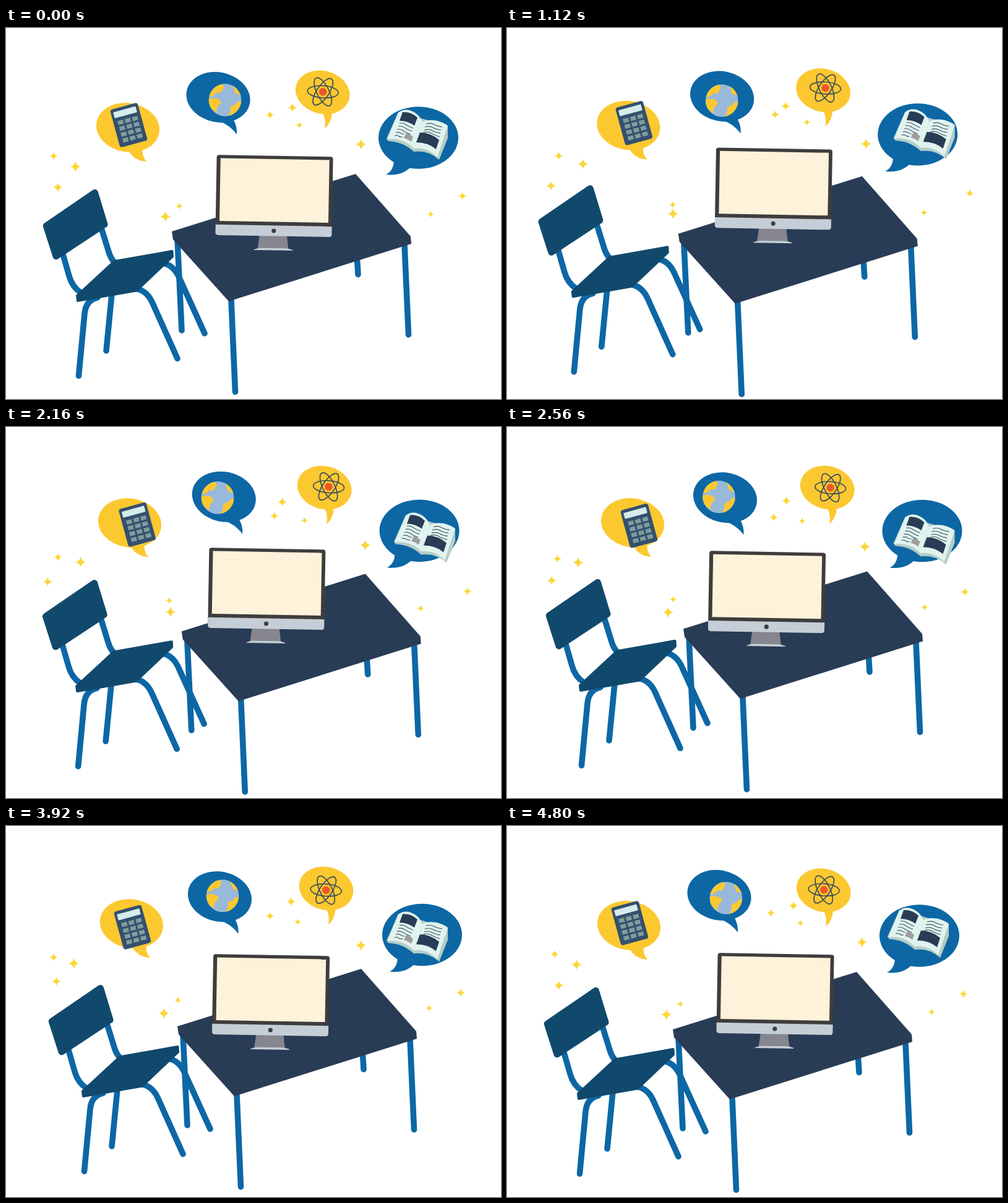
An HTML page that plays this animation: 800x600 px, repeating every 4880 ms.

```html
<!DOCTYPE html>
<html lang="en">
<head>
<meta charset="utf-8">
<title>Study desk</title>
<style>
html, body { margin: 0; width: 100%; height: 100%; overflow: hidden; background: #fff; }
svg { display: block; width: 800px; height: 600px; }
.blue { fill: #0d67a5; }
.yellow { fill: #fcc830; }
.navy { fill: #293c55; }
.seat { fill: #11496d; stroke: #11496d; stroke-linejoin: round; }
.legs { fill: none; stroke: #0d67a5; stroke-width: 9.6; stroke-linecap: round; }
.stars { fill: #fcd638; }
.lines { fill: none; stroke: #4a5967; stroke-width: 1.2; }
</style>
</head>
<body>
<svg viewBox="0 0 800 600">
  <defs>
    <path id="star" d="M0-1Q.16-.16 1 0Q.16.16 0 1Q-.16.16-1 0Q-.16-.16 0-1Z"/>
    <clipPath id="disc"><circle cx="354" cy="116.5" r="26.3"/></clipPath>
  </defs>

  <g class="stars" data-move="3 -.2 6.8 -.6 8 1 4.5 5.7 .5 8.6 0 5">
    <use href="#star" transform="translate(77 207.3) scale(6.6)"/>
    <use href="#star" transform="translate(426.7 140.5) scale(6.6)"/>
    <use href="#star" transform="translate(573.8 188) scale(8.6)"/>
  </g>
  <g class="stars" data-move="5 -2 10.7 -4.6 11.5 -6 2.7 -5 -4.3 -3.5 -2.7 -2">
    <use href="#star" transform="translate(112.3 224.3) scale(8.7)"/>
    <use href="#star" transform="translate(257.8 305) scale(8.7)"/>
    <use href="#star" transform="translate(474.2 157) scale(5.6)"/>
    <use href="#star" transform="translate(737.6 271.7) scale(6.6)"/>
  </g>
  <g class="stars" data-move="-6 -1 -13 -2.6 -17.7 -5.2 -11.5 -9.5 -5.5 -10.7 -2.3 -6.5">
    <use href="#star" transform="translate(83.8 257.8) scale(7.5)"/>
    <use href="#star" transform="translate(280.2 288.2) scale(5.6)"/>
    <use href="#star" transform="translate(463 128.8) scale(7.3)"/>
    <use href="#star" transform="translate(686.3 301) scale(5.6)"/>
  </g>

  <g class="yellow" data-move="-.7 -1.7 -.6 -3.4 1 -5 6 -6 10 -5.3 5.8 -2.9">
    <ellipse cx="197" cy="161" rx="51.3" ry="39.6" transform="rotate(9 197 161)"/>
    <path d="M198 198Q207 215 227 216Q219 207 221 194Z"/>
    <ellipse cx="511.7" cy="104" rx="44.3" ry="34.8" transform="rotate(14 511.7 104)"/>
    <path d="M512 137Q518 150 515 162.5Q526 154 527 136Z"/>
  </g>
  <g class="blue" data-move="2 -1.2 4.8 -1.4 7.5 -.5 9.5 2.3 6 3 2.5 2.3">
    <ellipse cx="343" cy="112" rx="52" ry="40.4" transform="rotate(12 343 112)"/>
    <path d="M342 150Q361 156 373 172Q374 159 367 147Z"/>
  </g>
  <g class="blue" data-move="-2 -2 -2.8 -5.5 -1 -8.5 4.5 -9.5 8 -5.5 6 -1.5">
    <ellipse cx="666.5" cy="177.5" rx="64.5" ry="50.3"/>
    <path d="M627 212Q627 231 614 237Q639 240 654 225Z"/>
  </g>

  <g data-move="3 -3 7.2 -3.2 11.5 -1 15 2.7 13.5 6.6 6 6.6">
    <g id="calculator" transform="translate(198.4 157) rotate(-15.3)">
      <rect x="-23" y="-31.7" width="46" height="63.4" rx="4" fill="#34506f"/>
      <rect x="-19" y="-26.5" width="37.5" height="10" rx="1" fill="#d5ecec"/>
    </g>
  </g>

  <g data-move="-2.7 1 -7 .9 -10.5 -.5 -11.5 -3.5 -7.5 -4.5 -4 -3.5">
    <circle cx="354" cy="116.5" r="26.3" fill="#98b9da"/>
    <path class="yellow" clip-path="url(#disc)" d="M327 112L333 96L346 89Q353 92 352 97Q350 99 349 103Q346 106 341 104Q338 106 336 109Q331 110 327 112Z
      M326 115Q334 112 340 114Q349 117 347 122Q342 125 341 131Q339 135 342 138L326 126Z
      M367 92Q366 97 369 99Q368 104 373 107Q376 106 379 110L384 98Z
      M382 119Q375 117 373 121Q372 124 366 125Q361 128 363 133Q362 138 359 142H376L384 126Z"/>
  </g>

  <g data-move="0 -3.5 2.5 -6.3 6.5 -7 10.5 -5 8 -1.5 5 .5">
    <g transform="translate(512.2 103.2)">
      <g fill="none" stroke="#3c4d5c" stroke-width="1.7">
        <ellipse rx="25" ry="9.8" transform="rotate(4)"/>
        <ellipse rx="25" ry="9.8" transform="rotate(64)"/>
        <ellipse rx="25" ry="9.8" transform="rotate(124)"/>
      </g>
      <circle r="5.8" fill="#e95a28" stroke="#e95a28" stroke-width="1.5" stroke-dasharray="3 1.5"/>
    </g>
  </g>

  <g data-move="4 -2 10 -.8 12.8 3.5 9.5 9.3 3.5 11.3 0 6.3">
    <path fill="#b5cdc7" d="M634 136L615 179L618 183Q642 184 659 200Q682 197 700 213L714 178V158Z"/>
    <path fill="#e0f3ef" d="M634 137C645 126 667 135 673 152L659 195C648 183 632 178 616 180Z"/>
    <path fill="#e0f3ef" d="M673 152C684 146 703 149 714 158L697 209C687 198 673 193 659 195Z"/>
    <path class="navy" d="M641 136Q655 135 665 145L660 158Q649 150 636 150Z M669 169Q686 169 700 181L695 196Q682 185 663 185Z"/>
    <path fill="#9d9d9b" d="M647 170Q653 172 658 176L655 184Q650 180 643 178Z"/>
    <path class="lines" d="M636 154q6-1 10 2t12 6M634 159q6-1 10 2t12 6M632 164q6-1 10 2t12 6M630 169q5-1 8 1t6 2M628 174q5-1 7 1t6 1
      M679 155q8-2 13 1t13 4M677 160q8-2 13 1t13 4M676 165q8-2 13 1t13 4M674 169q8-2 13 1t14 6"/>
  </g>

  <g data-move="4.5 2 9 3.8 13 3.7 17 -2.5 16 -8 9 -5">
    <path class="legs" d="M277 342L284 489M364 440L370.5 588.5M644 350L650.5 496M567.5 374L569 398.5"/>
    <path class="navy" d="M565 236L654 337L655 349L360 442L270 342L268 329Z"/>
    <path d="M270 331L360 431L653 338" fill="none" stroke="#46566b" stroke-width=".7" stroke-dasharray="1 2"/>
  </g>

  <g data-move="-6 -2 -9.2 -7 -5.2 -11.8 3 -15 9 -12 9 -4">
    <path class="legs" d="M92 366L102 401Q107 419 121 428M153 320L166 362Q169 373 177 381
      M117.5 562.5L127 462Q129 440 148 436M162 522L171 430
      M205 421Q226 422 236 443L277 534.5M252 380Q271 382 281 406L321 494"/>
    <path class="seat" stroke-width="11" d="M143.5 266.5L159 317.5L81 369L65.3 320Z"/>
    <path class="seat" stroke-width="4" d="M175 377.5L268.5 361L269 369.5L211 424.5L116 441L115 433Z"/>
  </g>

  <g data-move="1 -6.2 -3 -12 -9 -13 -13.5 -4.8 -10 1.5 -5.5 2">
    <g transform="rotate(1 433.5 271.8)">
      <path fill="#85868f" d="M411 335H455L458 358H408Z"/>
      <path fill="#c5ced6" d="M401 359.5Q408 356 414 356H452Q459 356 465 358.5V359.5Z"/>
      <rect x="339.5" y="206.7" width="188" height="125" rx="4" fill="#3e3d3d"/>
      <rect x="345.7" y="212" width="176" height="101.5" fill="#fff2da"/>
      <path fill="#c5ced6" d="M339.5 319.5H527.5V332Q527.5 336.5 523 336.5H344Q339.5 336.5 339.5 332Z"/>
      <circle cx="433.8" cy="328" r="3.6" fill="#3e3d3d"/>
    </g>
  </g>
</svg>
<script>
const LOOP = 4880, STEP = 80, TURN = 4800;
const keyTimes = [0, 560, 1160, 1760, 2560, 3280, 3920];

const calculator = document.getElementById('calculator');
for (let i = 0; i < 12; i++) {
  const key = document.createElementNS(calculator.namespaceURI, 'rect');
  const box = { x: -16 + i % 3 * 12, y: -11 + Math.floor(i / 3) * 9.8, width: 9, height: 6.6, fill: '#7f9d9b' };
  for (const name in box) key.setAttribute(name, box[name]);
  calculator.append(key);
}

// Each part starts at rest position and passes these offsets at the key times.
const parts = [...document.querySelectorAll('[data-move]')].map(node => ({
  node, offsets: [0, 0, ...node.dataset.move.split(' ').map(Number)]
}));

// Periodic interpolation: smooth closed orbits through every key point.
const halfSine = dt => Math.sin(Math.PI * dt / TURN);
const weightsAt = time => keyTimes.map(a => keyTimes.reduce(
  (w, b) => a === b ? w : w * halfSine(time - b) / halfSine(a - b), 1));

function draw(now) {
  const weights = weightsAt(Math.floor(now % LOOP / STEP) * STEP);
  for (const { node, offsets } of parts) {
    const [x, y] = [0, 1].map(axis =>
      weights.reduce((sum, w, i) => sum + w * offsets[2 * i + axis], 0));
    node.setAttribute('transform', `translate(${x.toFixed(2)} ${y.toFixed(2)})`);
  }
}

const start = performance.now();
(function tick() {
  draw(performance.now() - start);
  requestAnimationFrame(tick);
})();
</script>
</body>
</html>
```
